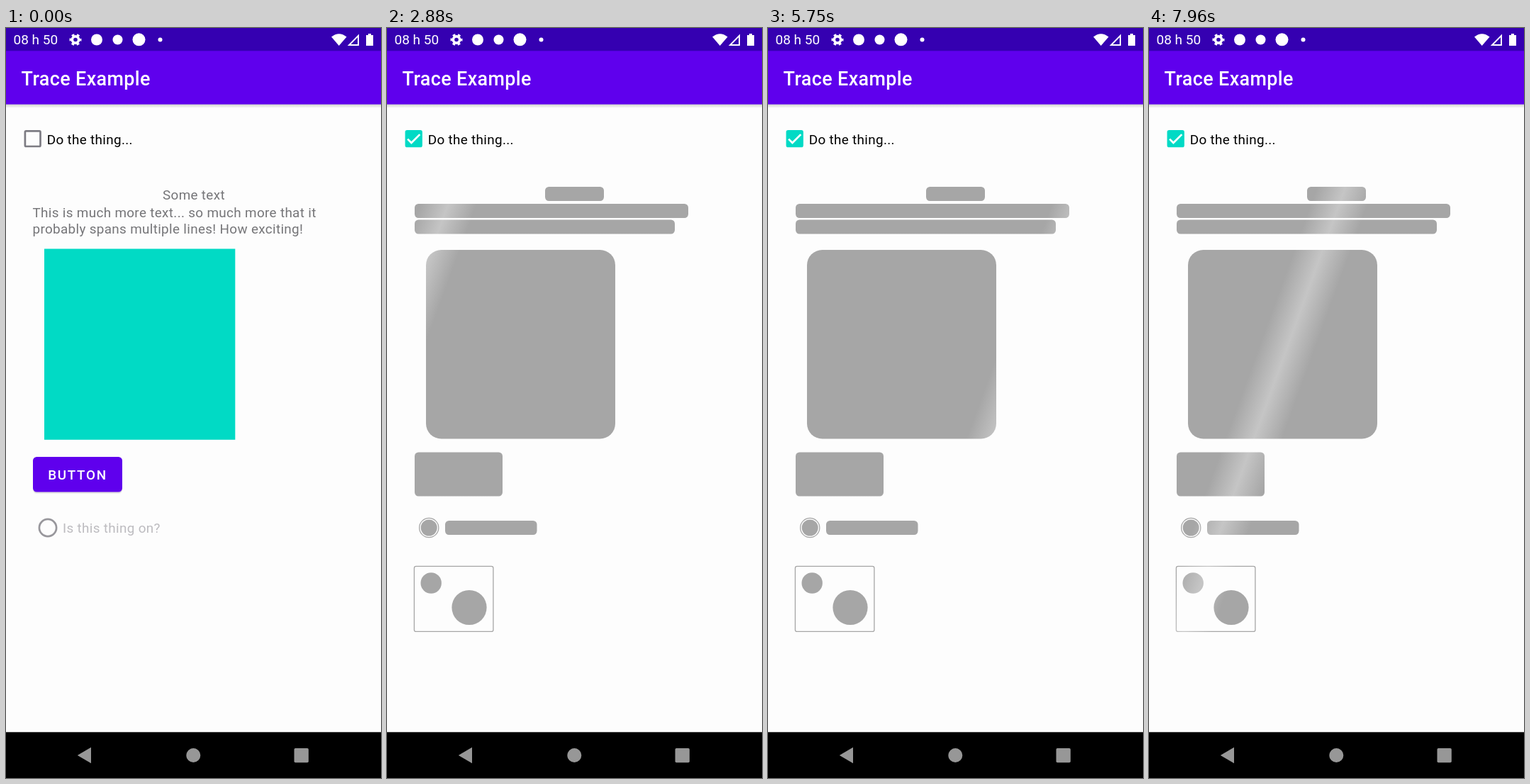
Animation of 529 by 1058 pixels, one loop 8000 ms. Source, as an HTML page:

```html
<!DOCTYPE html>
<html lang="en">
<head>
<meta charset="utf-8">
<title>Skeleton loading</title>
<style>
  html, body { margin: 0; width: 100%; height: 100%; overflow: hidden; background: #fdfdfd; }
  svg { display: block; width: 100vw; height: 100vh; }
  text { font: 400 18.86px Roboto, sans-serif; letter-spacing: .0179em; }
  .title { font-size: 26.94px; font-weight: 500; letter-spacing: .0125em; }
  .clock { font-size: 19px; letter-spacing: 0; }
  .button { font-weight: 500; letter-spacing: .0893em; }
</style>
</head>
<body>
<svg viewBox="0 0 529 1058">
  <defs>
    <linearGradient id="shimmer" gradientUnits="userSpaceOnUse" x1="-40" x2="40" y1="0" y2="0">
      <stop offset="0" stop-color="#a6a6a6"/>
      <stop offset=".5" stop-color="#c5c5c5"/>
      <stop offset="1" stop-color="#a6a6a6"/>
    </linearGradient>
    <linearGradient id="shadow" x2="0" y2="1">
      <stop offset="0" stop-opacity=".2"/>
      <stop offset="1" stop-opacity="0"/>
    </linearGradient>
  </defs>
  <rect width="529" height="1058" fill="#fdfdfd"/>

  <!-- App bar -->
  <rect y="107" width="529" height="6" fill="url(#shadow)"/>
  <rect width="529" height="107.7" fill="#5f00ed"/>
  <rect width="529" height="32.3" fill="#3500b1"/>
  <text class="title" x="21.6" y="81" fill="#fff">Trace Example</text>

  <!-- Status bar -->
  <g fill="#fff">
    <text class="clock" x="10.5" y="23.3">08 h 50</text>
    <g fill="none" stroke="#fff">
      <circle cx="98" cy="16.5" r="4.6" stroke-width="3.6"/>
      <circle cx="98" cy="16.5" r="7.2" stroke-width="2.6" stroke-dasharray="3.77 3.77" stroke-dashoffset="1.9"/>
    </g>
    <circle cx="128" cy="16.5" r="8"/>
    <circle cx="157.5" cy="16.5" r="7"/>
    <circle cx="187.5" cy="16.3" r="9"/>
    <circle cx="217.5" cy="16.5" r="3"/>
    <path d="M459 12.5Q469.7 4 480.500 12.500L469.700 25Z"/>
    <path d="M484 24H497V10.800Z" fill="none" stroke="#fff" stroke-width="1.9"/>
    <path d="M508 10h3V8h4v2h3v15h-10Z"/>
  </g>

  <!-- Checkbox row -->
  <circle id="ripple" cx="37.500" cy="156.500"/>
  <rect id="box" x="26.900" y="145.400" width="21.600" height="21.600" rx="1.500" stroke-width="2.700"/>
  <path id="tick" d="M-8.500 .300L-3.200 5.700L8.700 -6.200" fill="none" stroke="#fff" stroke-width="2.700"/>
  <text x="57.700" y="163.500">Do the thing...</text>

  <g id="content" fill="#757578">
    <text x="221" y="241.500">Some text</text>
    <text x="37.500" y="267.300">This is much more text... so much more that it</text>
    <text x="37.500" y="290">probably spans multiple lines! How exciting!</text>
    <rect x="54" y="311.500" width="269.300" height="269.300" fill="#01dac5"/>
    <rect x="38" y="606.500" width="126" height="50" rx="5.400" fill="#000" opacity=".12"/>
    <rect x="38" y="605" width="126" height="49.500" rx="5.400" fill="#5f00ed"/>
    <text class="button" x="59.200" y="637" fill="#fff">BUTTON</text>
    <circle cx="59" cy="705" r="12.100" fill="none" stroke="#98979c" stroke-width="2.700"/>
    <text x="80" y="712" fill="#bdbcc0">Is this thing on?</text>
  </g>

  <g id="skeleton" fill="url(#shimmer)">
    <rect x="223" y="224" width="83" height="20" rx="5.400"/>
    <rect x="39" y="248" width="386" height="20" rx="5.400"/>
    <rect x="39" y="270.500" width="367" height="20" rx="5.400"/>
    <rect x="55" y="313" width="267" height="266.500" rx="21.500"/>
    <rect x="39" y="598.500" width="124" height="62" rx="5.400"/>
    <circle cx="59.200" cy="705" r="11.500"/>
    <rect x="82" y="695" width="129.500" height="20" rx="5.400"/>
    <circle cx="62.200" cy="783" r="14.700"/>
    <circle cx="116" cy="817.500" r="24.600"/>
    <g fill="none" stroke="url(#shimmer)" stroke-width="1.300">
      <circle cx="59.200" cy="705" r="13.600"/>
      <rect x="38.400" y="759.400" width="111.500" height="92" rx="2.500"/>
    </g>
  </g>

  <!-- Navigation bar -->
  <rect y="993.300" width="529" height="64.700" fill="#000"/>
  <g fill="#979797">
    <path d="M100.800 1026L120 1014.700V1037.300Z"/>
    <circle cx="264.300" cy="1026" r="10"/>
    <rect x="406.500" y="1016" width="20.300" height="20.300" rx="1.800"/>
  </g>
</svg>
<script>
  const LOOP = 8000, CHECKED_AT = 1560;
  const SWEEP = 1000, PERIOD = 1200;
  const el = id => document.getElementById(id);
  const set = (id, attrs) => {
    for (const name in attrs) el(id).setAttribute(name, attrs[name]);
  };
  const ramp = (t, from, to) => Math.min(1, Math.max(0, (t - from) / (to - from)));
  const easeInOut = p => (1 - Math.cos(Math.PI * p)) / 2;

  function draw(t) {
    const checked = t >= CHECKED_AT;
    set('content', { display: checked ? 'none' : 'inline' });
    set('skeleton', { display: checked ? 'inline' : 'none' });

    // The sweep rests off the right edge between passes.
    const pass = Math.max(0, t - CHECKED_AT) % PERIOD;
    const x = 62 + 585 * easeInOut(ramp(pass, 0, SWEEP));
    set('shimmer', { gradientTransform: `translate(${x} 258) skewX(-20)` });

    set('ripple', {
      r: 27 * ramp(t, 1440, 1600),
      opacity: 0.12 * (1 - ramp(t, 1720, 1890))
    });
    set('box', {
      fill: '#01dac5',
      'fill-opacity': ramp(t, CHECKED_AT, 1680),
      stroke: checked ? '#01dac5' : '#7d7c83'
    });
    const tickScale = ramp(t, 1680, 1900);
    set('tick', { transform: `translate(37.6 156.300) scale(${tickScale})` });
  }

  function frame() {
    draw(performance.now() % LOOP);
    requestAnimationFrame(frame);
  }
  frame();
</script>
</body>
</html>
```
